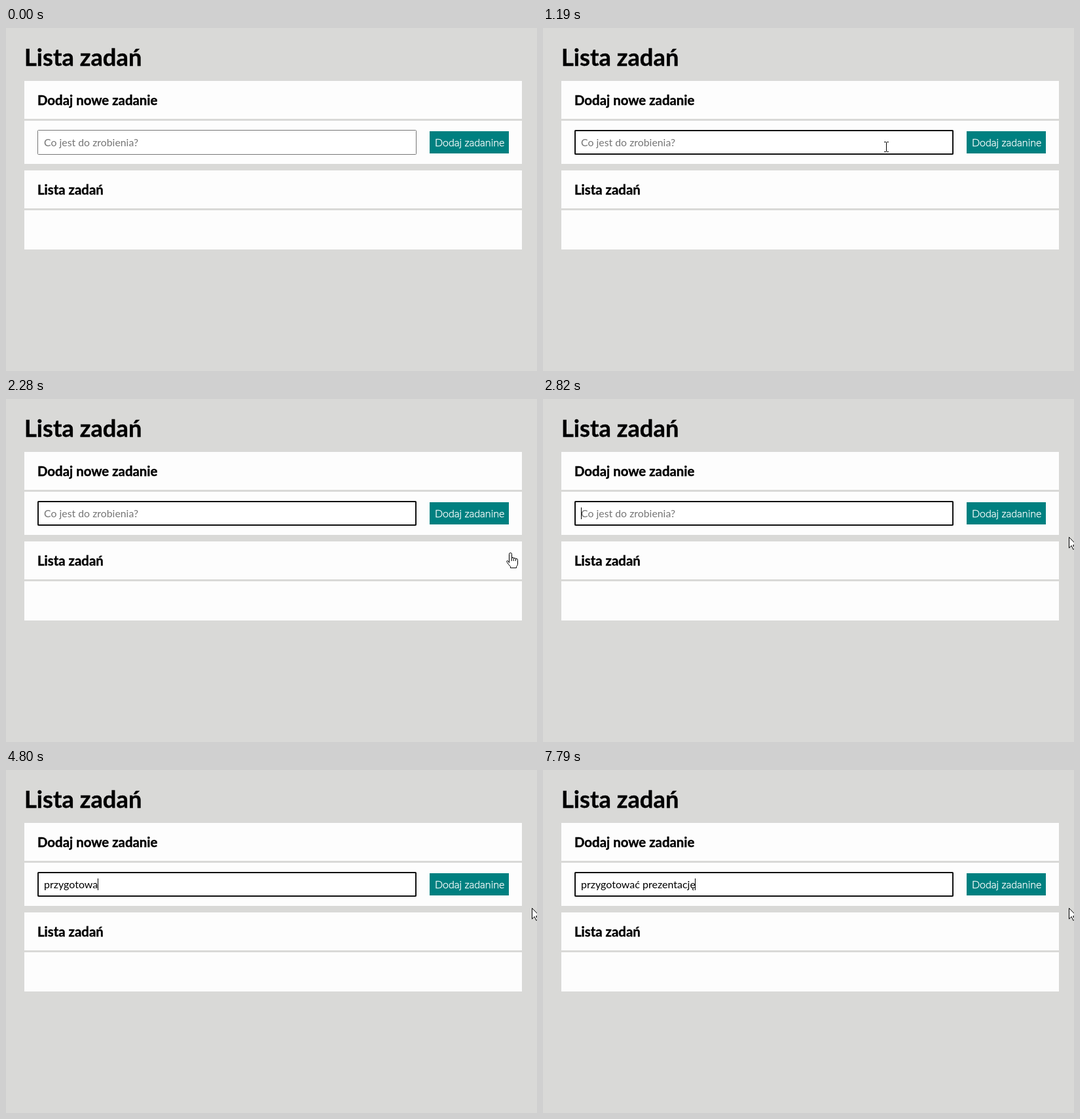
These frames come from a looping animation (811 px wide and 525 px high, 8 s). An HTML page:

```html
<!DOCTYPE html>
<html lang="pl">
<head>
<meta charset="utf-8">
<title>Lista zadań</title>
<style>
  html, body { margin: 0; width: 100%; height: 100%; overflow: hidden; background: #d9d9d7; }
  svg { display: block; width: 811px; height: 525px; }
  text { font: 400 16px Lato, sans-serif; white-space: pre; }
  .h1, .h2 { font-weight: 700; stroke: #000; stroke-width: .4; }
  .h1 { font-size: 36.3px; }
  .h2 { font-size: 20.4px; }
  .hint { font-size: 15.85px; fill: #757575; }
  .btn { font-weight: 300; fill: #fff; stroke: #fff; stroke-width: .35; }
  .panel { fill: #fdfdfd; }
  .pointer { stroke: #000; stroke-linejoin: round; fill: #fff; }
</style>
</head>
<body>
<svg viewBox="0 0 811 525">
  <rect width="811" height="525" fill="#d9d9d7"/>
  <text class="h1" x="28" y="58">Lista zadań</text>
  <g class="panel">
    <rect x="28" y="81" width="760" height="58"/>
    <rect x="28" y="142" width="760" height="66"/>
    <rect x="28" y="218" width="760" height="58"/>
    <rect x="28" y="279" width="760" height="60"/>
  </g>
  <text class="h2" x="48" y="118">Dodaj nowe zadanie</text>
  <text class="h2" x="48" y="255">Lista zadań</text>
  <rect id="field" x="48.5" y="156.5" width="578" height="37" rx="1" fill="#fff"/>
  <rect id="focus" x="49" y="157" width="577" height="36" rx="1" fill="none" stroke="#101010" stroke-width="2"/>
  <text id="hint" class="hint" x="58" y="181">Co jest do zrobienia?</text>
  <text id="typed" x="58" y="181"></text>
  <rect id="caret" y="166" width="1" height="18"/>
  <rect x="647" y="158" width="121" height="34" fill="#008080"/>
  <text class="btn" x="655" y="181">Dodaj zadanine</text>
  <g id="pointer">
    <path id="arrow" class="pointer" d="M.5 .5V17L4.2 13.4L6.8 19.2L9.2 18.2L6.7 12.5H12Z"/>
    <path id="beam" fill="none" stroke="#000" d="M-3 -7.5H0M1 -7.5H4M.5 -7V7M-3 7.5H0M1 7.5H4"/>
    <path id="hand" class="pointer" d="M-1.5 14.5V1.5Q-1.5 -.5 .5 -.5T2.5 1.5V8Q2.5 6.5 4 6.5T5.5 8.3Q5.5 7.5 7 7.5T8.5 9Q8.5 8.5 10 8.5T11.5 10.5V16Q11.5 19 9.5 20.5V22.5H.5V20.5Q-2.5 17.5 -5 13.5Q-5.8 11.8 -4.5 11.5T-1.5 14.5M2.5 8V12M5.5 8.3V12M8.5 9V12"/>
  </g>
</svg>
<script>
const LOOP = 8000, STEP = 70, FOCUS = 780;
const BLINK = 545, BLINK_START = 630;

// Curved pointer strokes; power below 1 slows down, above 1 speeds up.
const STROKES = [
  { start: 500, end: 1200, from: [748, 265], bend: [634, 116], to: [524, 182], ease: k => 1 - (1 - k) ** 3 },
  { start: 1720, end: 2280, from: [534, 192], bend: [720, 115], to: [770, 236], ease: k => k * k },
  { start: 2280, end: 2560, from: [770, 236], bend: [785, 265], to: [803, 211], ease: k => k }
];

// Typing comes in bursts of steady rhythm.
const BURSTS = [
  { text: 'przy', start: 3620, gap: 110 },
  { text: 'gotowa', start: 4150, gap: 130 },
  { text: 'ć p', start: 5260, gap: 200 },
  { text: 're', start: 5990, gap: 80 },
  { text: 'zentację', start: 6590, gap: 170 }
];

const el = id => document.getElementById(id);
const show = (id, on) => { el(id).style.display = on ? '' : 'none'; };
const inside = ([x, y], l, t, r, b) => x >= l && x < r && y >= t && y < b;
const overButton = p => p && inside(p, 647, 158, 768, 192);

function pointerAt(t) {
  const s = STROKES.filter(s => s.start <= t).pop();
  if (!s) return null;
  const held = Math.floor((t - s.start) / STEP) * STEP;
  const u = s.ease(Math.min(held / (s.end - s.start), 1));
  return s.from.map((a, i) =>
    Math.round((1 - u) ** 2 * a + 2 * u * (1 - u) * s.bend[i] + u * u * s.to[i]));
}

function shapeAt(t) {
  const p = pointerAt(t);
  if (!p) return '';
  // The hand lingers for one step after leaving the button.
  if (overButton(p) || overButton(pointerAt(t - STEP))) return 'hand';
  return inside(p, 48, 156, 627, 194) ? 'beam' : 'arrow';
}

function typedAt(t) {
  return BURSTS.map(b => b.text.slice(0, Math.max(0, Math.floor((t - b.start) / b.gap) + 1))).join('');
}

function drawPointer(t) {
  const p = pointerAt(t), shape = shapeAt(t);
  for (const id of ['arrow', 'beam', 'hand']) show(id, id === shape);
  if (p) el('pointer').setAttribute('transform', `translate(${p})`);
  el('field').setAttribute('stroke', shape === 'beam' ? '#4f4f4f' : '#767676');
}

function drawField(t) {
  const value = typedAt(t), typed = el('typed');
  const lit = Math.floor((t - BLINK_START) / BLINK) % 2 === 0;
  typed.textContent = value;
  show('hint', !value);
  show('focus', t >= FOCUS);
  show('caret', t >= FOCUS && (value || lit));
  const width = value ? typed.getComputedTextLength() : 0;
  el('caret').setAttribute('x', Math.floor(58 + width));
}

function frame() {
  const t = performance.now() % LOOP;
  drawPointer(t);
  drawField(t);
  requestAnimationFrame(frame);
}
frame();
</script>
</body>
</html>
```
